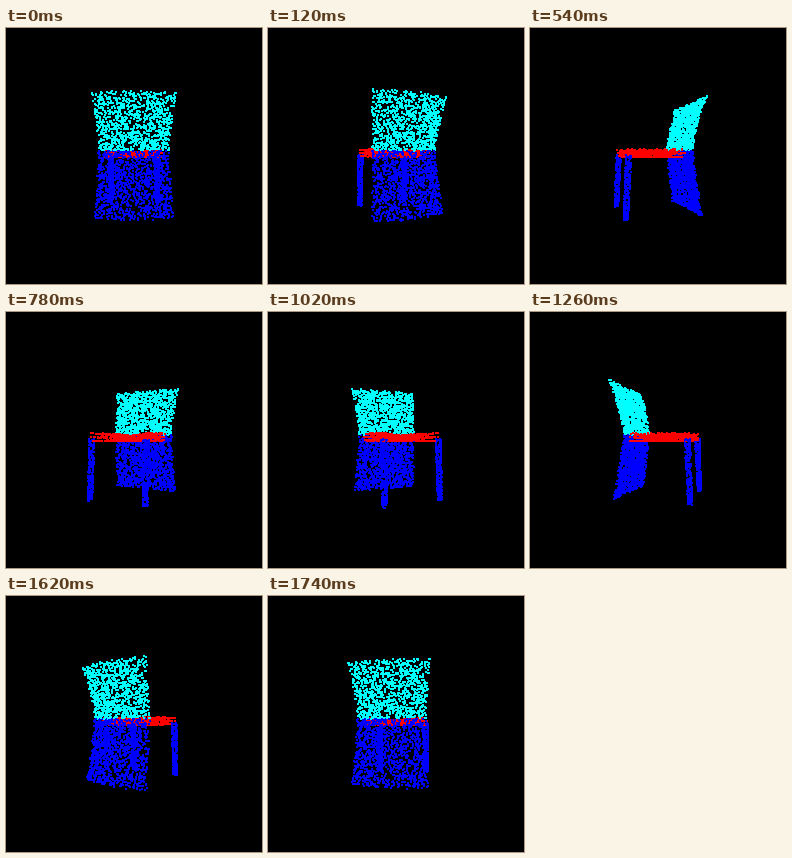
Recreate the animation shown at these times as a matplotlib script. Size 256 px wide and 256 px high, loop 1.8 s.

```python
import numpy as np
import matplotlib.pyplot as plt
from matplotlib.animation import FuncAnimation

SIZE, DPI = 256, 100
FRAMES, STEP_MS = 30, 60
CENTER_X, HORIZON = 128, 126
CAMERA = 245          # distance from the turning axis, in pixels
SPLIT = 3             # height where the backrest meets the lower panel
CYAN, BLUE, RED = (0, 255, 255), (0, 0, 255), (255, 0, 0)

rng = np.random.default_rng(7)


def panel(n, end, spread, flare, power, bulge):
    """Curved sheet from the seat line to height `end`, as (side, up, back)."""
    t = rng.random(n)
    u = rng.uniform(-1, 1, n)
    half = 32.3 + spread * t ** power
    back = 22 + flare * t ** power + (3 + bulge * t) * (1 - u ** 2)
    up = SPLIT + (end - SPLIT) * t + np.sign(end) * t * (1 - u ** 2)
    back += rng.choice([-1, 1], n)
    return np.column_stack([u * half, up, back])


def seat(n):
    """Thin slab whose top dips towards the middle."""
    side = rng.uniform(-28.3, 28.3, n)
    back = rng.uniform(-37.3, 18.3, n)
    top = 2 + 2.5 * (side / 28) ** 2
    up = -2.5 + rng.choice([0, 0.5, 1], n) * (top + 2.5)
    return np.column_stack([side, up, back])


def leg(n, side):
    t = rng.random(n)
    thick = 2.5 - 0.6 * t
    a = rng.uniform(0, 2 * np.pi, n)
    return np.column_stack([side + thick * np.cos(a),
                            -1 - 55.5 * t,
                            -35 - 2.5 * t + thick * np.sin(a)])


parts = [
    (panel(1080, 52.6, 4.3, 12, 1.6, 1.5), CYAN),
    (panel(1230, -56, 2.3, 8, 1.2, 0.5), BLUE),
    (seat(800), RED),
    (leg(220, -26.7), BLUE),
    (leg(220, 26.7), BLUE),
]
points = np.vstack([p for p, _ in parts])
colors = np.vstack([np.tile(c, (len(p), 1)) for p, c in parts])


def render(i):
    """Splat every point as a 2 by 2 dot, farthest first."""
    angle = 2 * np.pi * i / FRAMES
    side, up, back = points.T
    x = side * np.cos(angle) + back * np.sin(angle)
    z = back * np.cos(angle) - side * np.sin(angle)
    zoom = 1 / (1 - z / CAMERA)
    col = np.rint(CENTER_X + x * zoom).astype(int)
    row = np.rint(HORIZON - up * zoom).astype(int)
    canvas = np.zeros((SIZE, SIZE, 3), np.uint8)
    for k in np.argsort(z):
        canvas[row[k] - 1:row[k] + 1, col[k] - 1:col[k] + 1] = colors[k]
    return canvas


fig = plt.figure(figsize=(SIZE / DPI, SIZE / DPI), dpi=DPI, facecolor="black")
ax = fig.add_axes([0, 0, 1, 1])
ax.axis("off")
view = ax.imshow(render(0), interpolation="nearest", aspect="auto")


def update(i):
    view.set_data(render(i))
    return (view,)


anim = FuncAnimation(fig, update, frames=FRAMES, interval=STEP_MS,
                     repeat=True, repeat_delay=0)
plt.show()
```
